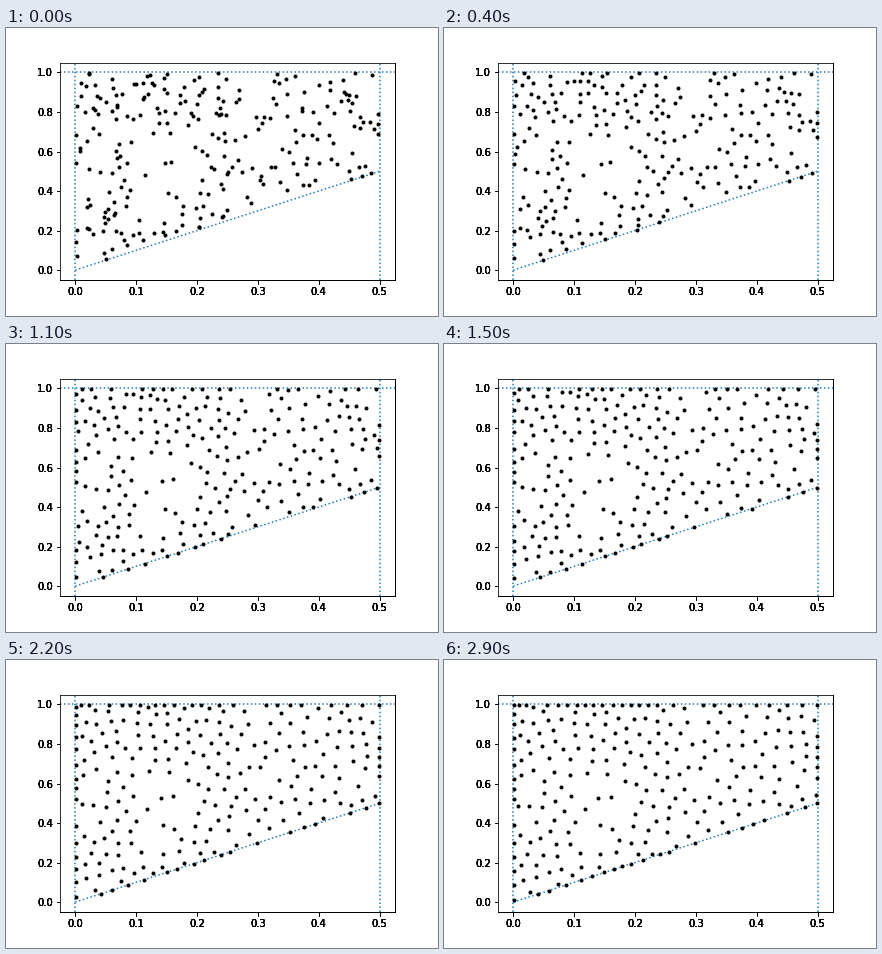
A matplotlib script that plays this animation: 432 px wide and 288 px high, repeating every 3 s.

```python
import numpy as np
import matplotlib.pyplot as plt
from matplotlib.animation import FuncAnimation

FRAMES, STEP_MS = 30, 100
COUNT, SUBSTEPS, PUSH, MAX_MOVE = 250, 4, 20.0, 1.0
OVERPRINTS = 5

# Extent of the area in pixels: x from 0 to 0.5, y from 0 to 1
W, H = 304.36, 197.67
SLOPE = 0.5 * H / W


def confine(p):
    """Put points that left the area back on its nearest edge."""
    below = np.maximum(SLOPE * p[:, 0] - p[:, 1], 0) / (1 + SLOPE ** 2)
    p = p + np.column_stack([-SLOPE * below, below])
    p[:, 0] = np.clip(p[:, 0], 0.8, W - 0.4)
    p[:, 1] = np.clip(p[:, 1], SLOPE * p[:, 0], H - 0.8)
    return p


def start_points():
    rng = np.random.default_rng(12)
    p = rng.uniform((0, 0), (W, H), (2 * COUNT, 2))
    return confine(p[p[:, 1] > SLOPE * p[:, 0]][:COUNT])


def relax(p):
    """Let every point push the others away by the inverse square."""
    for _ in range(SUBSTEPS):
        d = p[:, None] - p[None]
        r2 = (d ** 2).sum(-1) + 0.3
        move = PUSH / SUBSTEPS * (d / r2[..., None] ** 1.5).sum(1)
        size = np.hypot(*move.T)[:, None]
        move *= np.minimum(1, MAX_MOVE / np.maximum(size, 1e-9))
        p = confine(p + move)
    return p


path = [start_points()]
for _ in range(FRAMES - 1):
    path.append(relax(path[-1]))

fig = plt.figure(figsize=(6, 4), dpi=72, facecolor="white")

# Stacked axes make the frame and labels print solid black
for _ in range(OVERPRINTS):
    ax = fig.add_axes([0.125, 0.125, 0.775, 0.755])
    ax.set_xlim(-0.025, 0.525)
    ax.set_ylim(-0.05, 1.05)
    ax.set_xticks(np.arange(6) / 10)
    ax.set_yticks(np.arange(6) / 5)

for x in (0, 0.5):
    ax.axvline(x, color="C0", ls=":")
ax.axhline(1, color="C0", ls=":")
ax.plot([0, 0.5], [0, 0.5], color="C0", ls=":")
dots, = ax.plot([], [], "k.")


def draw(n):
    dots.set_data(0.5 * path[n][:, 0] / W, path[n][:, 1] / H)
    return dots,


anim = FuncAnimation(fig, draw, frames=FRAMES, interval=STEP_MS,
                     repeat=True, repeat_delay=0)
plt.show()
```
